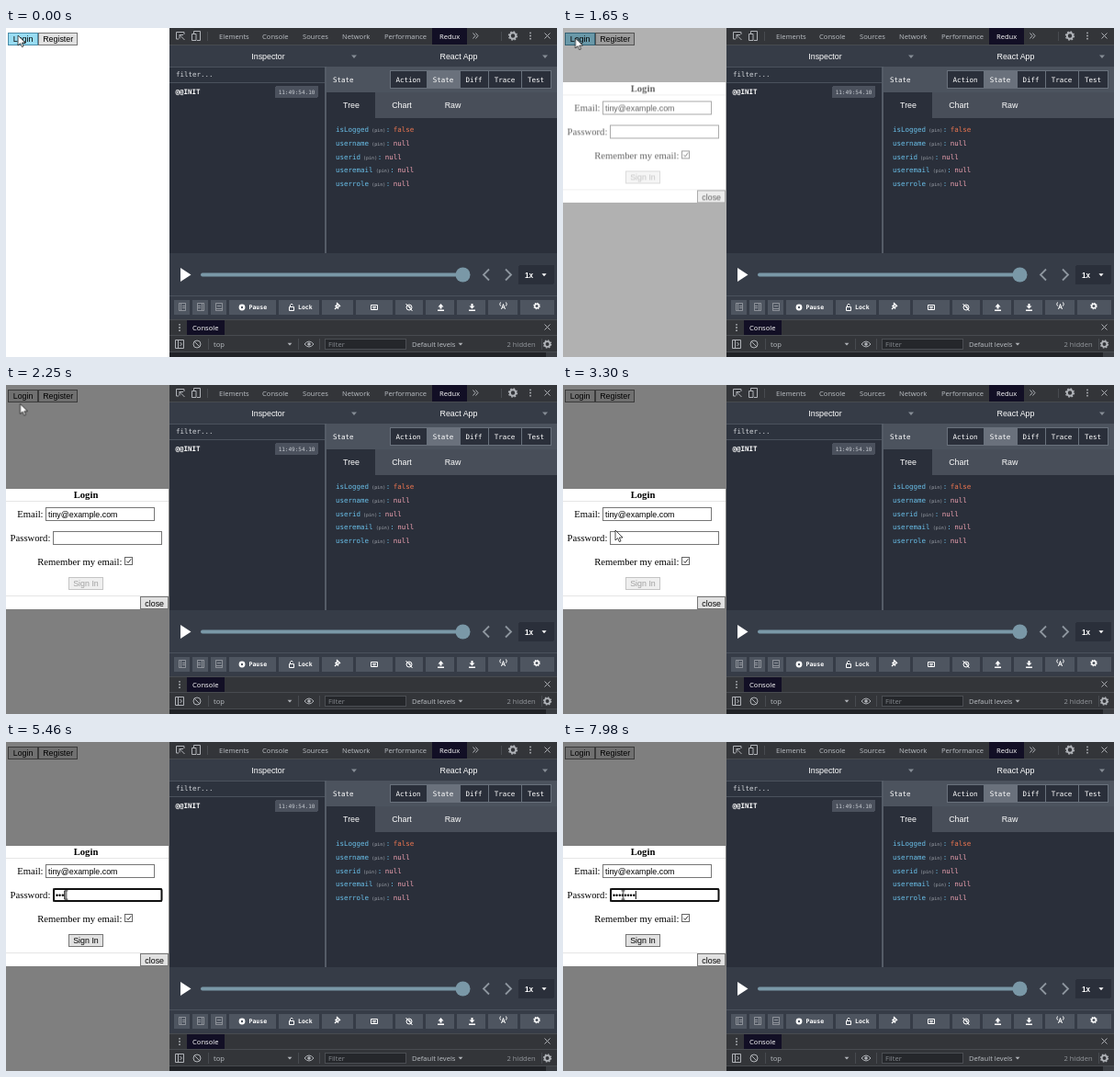
An HTML page that plays this animation: 600 by 358 pixels, repeating every 8000 ms.

```html
<!DOCTYPE html>
<html lang="en">
<head>
<meta charset="utf-8">
<title>Login dialog</title>
<style>
html, body { margin: 0; width: 100%; height: 100%; overflow: hidden; background: #fff; }
svg { display: block; width: 600px; height: 358px; }
rect { shape-rendering: crispEdges; }
text { white-space: pre; }
.ui { font: 8.87px "Liberation Sans", Arial, sans-serif; }
.serif { font: 10.65px "Liberation Serif", "Times New Roman", serif; }
.dev { font: 7.6px "Open Sans", sans-serif; fill: #bcc0c5; }
.mono { font: 7.5px "DejaVu Sans Mono", monospace; fill: #fff; }
.small { font-size: 6.5px; }
.bold { font-weight: bold; }
.mid { text-anchor: middle; }
.key { fill: #6ac0ea; }
.pin { font-size: 5px; fill: #a3a8b0; }
.null { fill: #f0a3b2; }
.false { fill: #ee7650; }
.line { fill: none; stroke: #b0b3b8; stroke-width: 1; }
.white { fill: none; stroke: #fff; stroke-width: 1; }
.field { fill: #fff; stroke: #767676; }
.btn { fill: #e1e1e1; stroke: #777; }

/* every animation shares one 8 s clock */
.anim { animation: 8s linear infinite; }
.cut { animation-timing-function: step-end; }
#modal { animation-name: fade; }
#dialog { animation-name: drop; }
#hover { animation-name: hover; }
#pointer { animation-name: move; }
#arrow { animation-name: arrow; }
#beam { animation-name: beam; }
#focus { animation-name: focus; }
#enabled { animation-name: enable; }
#mask, #caret { animation-name: type; }
#blink { animation-name: blink; }
@keyframes fade {
  0% { opacity: 0; }
  18.875% { opacity: 0; animation-timing-function: ease; }
  23.875%, 100% { opacity: 1; }
}
@keyframes drop {
  0% { transform: translateY(-137px); }
  18.875% { transform: translateY(-137px); animation-timing-function: ease; }
  23.875%, 100% { transform: none; }
}
@keyframes hover { 0% { opacity: 1; } 21.4%, 100% { opacity: 0; } }
@keyframes move {
  0% { transform: translate(13px, 8px); }
  5%, 23% { transform: translate(13.5px, 11px); }
  27%, 30.5% { transform: translate(15.5px, 20.5px); animation-timing-function: ease-in-out; }
  40.5%, 41.6% { transform: translate(57px, 158px); animation-timing-function: ease-in-out; }
  45.5%, 100% { transform: translate(65.5px, 166.5px); }
}
@keyframes arrow { 0% { opacity: 1; } 42.6%, 100% { opacity: 0; } }
@keyframes beam { 0% { opacity: 0; } 42.6%, 100% { opacity: 1; } }
@keyframes focus { 0% { opacity: 0; } 47.5%, 100% { opacity: 1; } }
@keyframes enable { 0% { opacity: 0; } 61.125%, 100% { opacity: 1; } }
@keyframes type {
  0% { transform: translateX(0); }
  61.125% { transform: translateX(3.1px); }
  64.125% { transform: translateX(6.2px); }
  68.25% { transform: translateX(9.3px); }
  71.25% { transform: translateX(12.4px); }
  75% { transform: translateX(15.5px); }
  77.25% { transform: translateX(18.6px); }
  80.625% { transform: translateX(21.7px); }
  84.375%, 100% { transform: translateX(24.8px); }
}
@keyframes blink {
  0% { opacity: 0; }
  47.5% { opacity: 1; }
  54% { opacity: 0; }
  60.5% { opacity: 1; }
  90.75% { opacity: 0; }
  97.125%, 100% { opacity: 1; }
}
</style>
</head>
<body>
<svg viewBox="0 0 600 358">
  <defs>
    <g id="gear">
      <circle r="3.2" fill="none" stroke="currentColor" stroke-width="2"/>
      <circle r="4.5" fill="none" stroke="currentColor" stroke-width="1.4" stroke-dasharray="1.75 1.78"/>
    </g>
    <path id="close" d="M-3-3 3 3M3-3-3 3" class="line"/>
    <path id="down" d="M-3-1.5H3L0 2Z"/>
    <g id="kebab" fill="#b0b3b8"><circle cy="-3.2" r=".9"/><circle r=".9"/><circle cy="3.2" r=".9"/></g>
    <clipPath id="typed"><rect id="mask" class="anim cut" x="29" y="160" width="25" height="13"/></clipPath>
  </defs>

  <!-- page -->
  <rect width="178" height="358" fill="#fff"/>
  <g class="ui">
    <rect class="btn" x="2.5" y="5.5" width="32" height="13"/>
    <rect id="hover" class="anim cut" x="2.5" y="5.5" width="32" height="13" fill="#98dcf2" stroke="#4b8ca8"/>
    <rect class="btn" x="35.5" y="5.5" width="42" height="13"/>
    <text x="18.6" y="15.3" class="mid">Login</text>
    <text x="56.7" y="15.3" class="mid">Register</text>
  </g>

  <g id="modal" class="anim">
    <rect width="178" height="358" fill-opacity=".5"/>
    <g id="dialog" class="anim">
      <rect y="113" width="177" height="131" fill="#fff"/>
      <path d="M0 126.5H177M0 229.5H177" stroke="#e5e5e5"/>
      <g class="serif">
        <text x="87" y="123.2" class="mid bold">Login</text>
        <text x="12.2" y="143.5">Email:</text>
        <text x="4.6" y="169.6">Password:</text>
        <text x="34.2" y="195.8">Remember my email:</text>
      </g>
      <g class="ui">
        <rect class="field" x="43.5" y="133.5" width="118" height="14"/>
        <text x="46" y="143.5">tiny@example.com</text>
        <rect class="field" x="51.5" y="159.5" width="118" height="14"/>
        <g id="focus" class="anim cut">
          <rect x="52" y="160" width="117.5" height="13" rx="1.5" fill="#fff" stroke="#101010" stroke-width="2" style="shape-rendering:auto"/>
        </g>
        <g clip-path="url(#typed)"><text x="54" y="169.8">••••••••</text></g>
        <g id="blink" class="anim cut"><rect id="caret" class="anim cut" x="54" y="162" width="1" height="9"/></g>
        <rect x="129.5" y="187.5" width="8" height="8" fill="#fff" stroke="#666"/>
        <path d="M131.3 191.6 133 193.5 136.2 189.4" fill="none" stroke="#333"/>
        <rect x="68.5" y="209.5" width="37" height="13" fill="#efefef" stroke="#c4c4c4"/>
        <text x="87" y="219.3" class="mid" fill="#a0a0a0">Sign In</text>
        <g id="enabled" class="anim cut">
          <rect class="btn" x="68.5" y="209.5" width="37" height="13"/>
          <text x="87" y="219.3" class="mid">Sign In</text>
        </g>
        <rect class="btn" x="146.5" y="230.5" width="30" height="13"/>
        <text x="161.7" y="240.5" class="mid">close</text>
      </g>
    </g>
  </g>

  <g id="pointer" class="anim">
    <path id="arrow" class="anim cut" d="M0 0V11L2.6 8.6 4.3 12.6 6 11.9 4.4 8H8Z" fill="#fff" stroke="#000" stroke-width=".7"/>
    <path id="beam" class="anim cut" d="M-2-5H2M0-5V5M-2 5H2" fill="none" stroke="#111"/>
  </g>

  <!-- developer tools -->
  <rect x="178" width="422" height="358" fill="#2a2f3a"/>
  <rect x="178" width="422" height="18" fill="#333539"/>
  <rect x="464" width="38" height="18" fill="#120f25"/>
  <g id="tabs" class="dev"></g>
  <path class="line" d="M188 12H185.5V4.5H194V7M189 7.5 194.5 13M189 11.5V7.5H193M204.5 6V3.5H211.5V13.5H208M202.5 6.5H207V13.5H202.5Z"/>
  <path class="line" d="M508.5 5.5 511 8.5 508.5 11.5M511.5 5.5 514 8.5 511.5 11.5"/>
  <path d="M219.5 4V14M539.5 4V14M178 18.5H600" stroke="#484b50"/>
  <use href="#gear" x="552" y="8.5" color="#b0b3b8"/>
  <use href="#kebab" x="571" y="8.5"/>
  <use href="#close" x="589.5" y="8.5"/>

  <rect x="178" y="19" width="422" height="23" fill="#363c47"/>
  <g class="ui mid" fill="#fff">
    <text x="285.5" y="34.3">Inspector</text>
    <text x="493" y="34.3">React App</text>
  </g>
  <use href="#down" x="379" y="31" fill="#868d96"/>
  <use href="#down" x="587" y="31" fill="#868d96"/>

  <rect x="178" y="42" width="170" height="17" fill="#2d333e"/>
  <path d="M178 42.5H600M178 59.5H347" stroke="#4b525d"/>
  <rect x="347" y="42" width="2" height="203" fill="#555c67"/>
  <text class="mono" x="185" y="53" style="fill:#d2d5da">filter...</text>
  <text class="mono bold" x="184.5" y="72.3">@@INIT</text>
  <rect x="293" y="63" width="47" height="13" rx="2" fill="#4b515d"/>
  <text class="mono mid" x="316.5" y="71.5" style="font-size:6px;fill:#c6cad0">11:49:54.10</text>

  <rect x="349" y="43" width="251" height="27" fill="#4c535e"/>
  <text class="mono" x="356" y="59">State</text>
  <g id="views"></g>
  <rect x="349" y="70" width="251" height="28" fill="#484e59"/>
  <rect x="349" y="70" width="53" height="28" fill="#2a2f3a"/>
  <g class="ui mid" fill="#fff">
    <text x="376" y="87.3">Tree</text>
    <text x="431" y="87.3">Chart</text>
    <text x="486.5" y="87.3">Raw</text>
  </g>
  <g id="state"></g>

  <rect x="178" y="245" width="422" height="46" fill="#363c47"/>
  <path d="M190 261V276L201.5 268.5Z" fill="#fff"/>
  <rect x="212" y="266.5" width="288" height="4" rx="2" fill="#7a98a7" style="shape-rendering:auto"/>
  <circle cx="497.5" cy="268.5" r="8" fill="#7a98a7"/>
  <path d="M526 262.5 520 268.5 526 274.5M544 262.5 550 268.5 544 274.5" fill="none" stroke="#8e969f" stroke-width="1.8"/>
  <rect x="558" y="258" width="39" height="21" rx="2" fill="#2a2f3a"/>
  <text class="ui bold" x="565" y="271.5" fill="#fff" style="font-size:8.2px">1x</text>
  <use href="#down" transform="translate(586 268.5) scale(.85)" fill="#fff"/>

  <rect x="178" y="291" width="422" height="26" fill="#363c47"/>
  <path d="M178 291.5H600" stroke="#4b525d"/>
  <g id="tools"></g>
  <g class="white">
    <path d="M188.5 299.5H195.5V307.5H188.5ZM190.5 300V307M192 302.5H195M192 304.5H195M208.5 299.5H215.5V307.5H208.5ZM213.5 300V307M209 302.5H212M209 304.5H212M228.5 299.5H235.5V307.5H228.5ZM229 305.5H235M230 302.5H234" opacity=".35"/>
    <circle cx="257" cy="304" r="2.3" stroke-width="2.2"/>
    <path d="M308.5 303.5H313.5V307.5H308.5ZM309.5 303V301.5Q311 298.5 312.5 301.5"/>
    <path d="M360 299 364 303M361 300.5 359 303.5M363 302 360.5 305M358.5 302 362 305.5M360 304 358 306" stroke-width="1.4"/>
    <path d="M397.5 301.5H404.5V306.5H397.5ZM399 303.5H403M399.5 305H402.5"/>
    <circle cx="439" cy="304" r="3"/><path d="M435.5 300 442.5 308M439 302V304H441"/>
  </g>
  <path d="M470.5 303.5 473.5 300 476.5 303.5H474.5V305.5H472.5V303.5ZM470 306.5H477V308H470ZM504.5 302.5H506.5V300H508.5V302.5H510.5L507.5 305.5ZM504 306.5H511V308H504Z" fill="#fff"/>
  <path class="white" d="M539.5 306 541.5 300.5 543.5 306M540 304H543M538.5 298.5Q537 300.5 538.5 302.5M544.5 298.5Q546 300.5 544.5 302.5" stroke-width=".9"/>
  <use href="#gear" transform="translate(578 302.5) scale(.72)" color="#fff"/>
  <text class="mono bold small" x="264.5" y="306.3">Pause</text>
  <text class="mono bold small" x="318" y="306.3">Lock</text>

  <!-- console drawer -->
  <rect x="178" y="317" width="422" height="36" fill="#333539"/>
  <rect x="197" y="317" width="41" height="17" fill="#120f25"/>
  <path d="M178 317.5H600M178 334.5H600M220.5 338V350M318.5 338V350M341.5 338V350M583.5 338V350" stroke="#484b50"/>
  <use href="#kebab" x="189" y="326"/>
  <use href="#close" x="589.5" y="325.5"/>
  <path class="line" d="M184.5 339.5H193.5V348.5H184.5ZM187.5 340V348M189.5 342 191.5 344 189.5 346"/>
  <circle class="line" cx="208" cy="344" r="4"/>
  <path class="line" d="M205.2 341.2 210.8 346.8M325 344Q330 338 335 344Q330 350 325 344Z"/>
  <circle cx="330" cy="344" r="1.8" fill="#b0b3b8"/>
  <rect x="347.5" y="338.5" width="88" height="11" fill="#25272b" stroke="#4b4e53"/>
  <g class="dev">
    <text x="203" y="328.7" fill="#fff">Console</text>
    <text x="226" y="346.7">top</text>
    <text x="351" y="346.7" fill="#85898e">Filter</text>
    <text x="442" y="346.7">Default levels</text>
    <text x="545.5" y="346.7" fill="#94989d">2 hidden</text>
  </g>
  <g fill="#b0b3b8">
    <use href="#down" transform="translate(309 344) scale(.8)"/>
    <use href="#down" transform="translate(495 344) scale(.8)"/>
  </g>
  <use href="#gear" transform="translate(589.5 344) scale(.9)" color="#b0b3b8"/>
  <rect x="178" y="353" width="422" height="5" fill="#202226"/>
  <rect x="178" y="352" width="422" height="1" fill="#484b50"/>
  <rect x="588" y="353" width="12" height="5" fill="#3a3d42"/>
</svg>
<script>
const fill = (id, items, draw) => {
  document.getElementById(id).innerHTML = items.map(draw).join("");
};

fill("tabs", [["Elements", 232], ["Console", 279], ["Sources", 323], ["Network", 366], ["Performance", 412], ["Redux", 472]],
  ([name, x]) => `<text x="${x}" y="11.5"${name === "Redux" ? ' fill="#fff"' : ""}>${name}</text>`);

fill("views", [["Action", 418, 40], ["State", 458, 36], ["Diff", 494, 31], ["Trace", 525, 36], ["Test", 561, 32]],
  ([name, x, w]) => `<rect x="${x + .5}" y="46.5" width="${w}" height="19" stroke="#69717c"
    fill="${name === "State" ? "#6a717c" : "#2a2f3a"}"/>
    <text class="mono mid" x="${x + w / 2}" y="59">${name}</text>`);

fill("state", [["isLogged", "false"], ["username", "null"], ["userid", "null"], ["useremail", "null"], ["userrole", "null"]],
  ([key, value], i) => `<text class="mono" x="359" y="${113 + 14.8 * i}"><tspan class="key">${key}</tspan>` +
    `<tspan class="pin" dx="3">(pin)</tspan><tspan class="key" dx=".5">:</tspan>` +
    `<tspan class="${value}" dx="3.5">${value}</tspan></text>`);

fill("tools", [[183, 17], [203, 17], [223, 17], [243, 51], [297, 44], [344, 34], [381, 40], [424, 30], [457, 31], [491, 31], [525, 32], [560, 37]],
  ([x, w]) => `<rect x="${x}" y="296" width="${w}" height="16" rx="1.5" fill="#4e5560"/>`);
</script>
</body>
</html>
```
